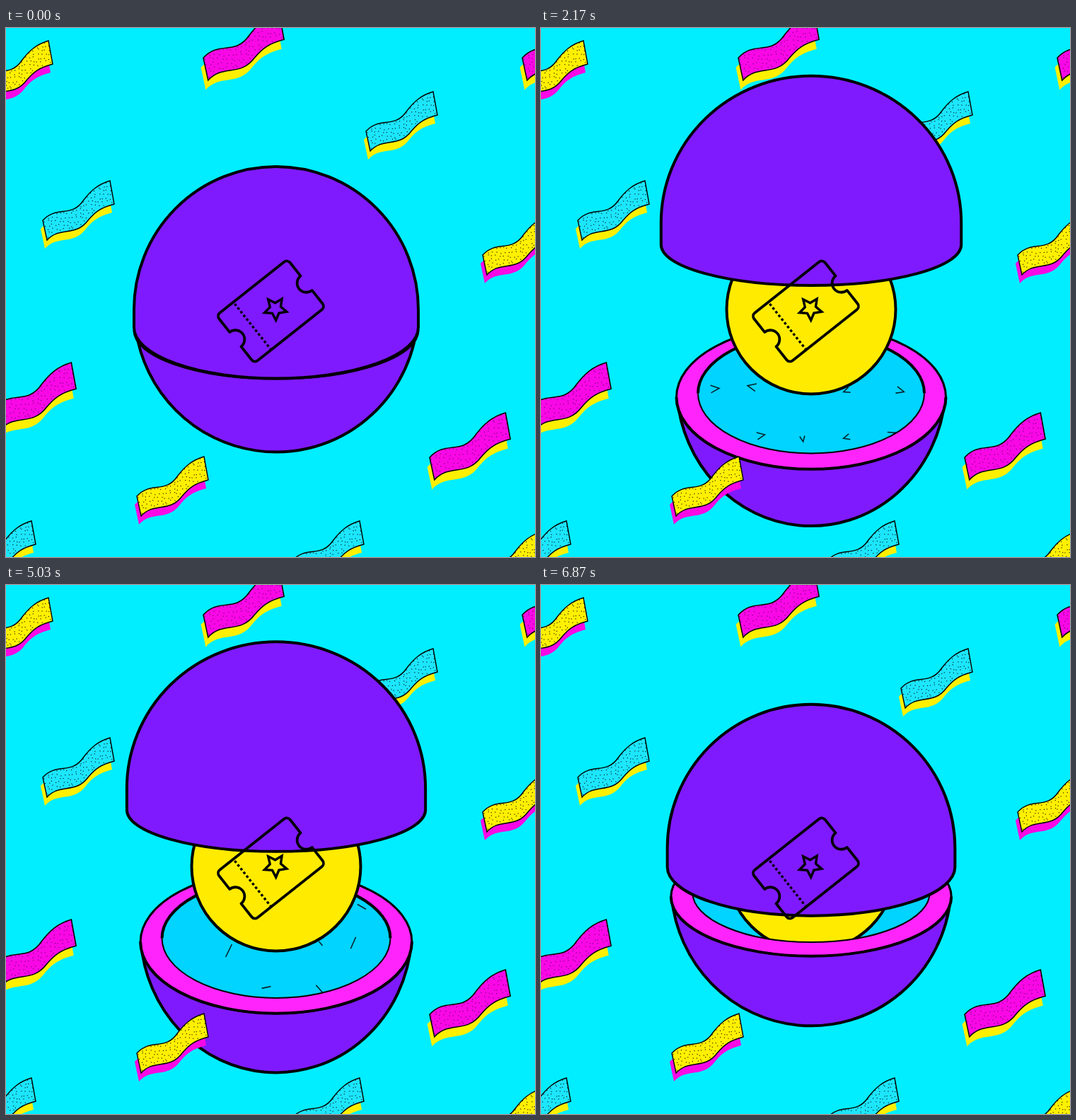
An HTML page with a canvas that plays this animation: 748 by 748 pixels, repeating every 6.96 s.

```html
<!DOCTYPE html>
<html lang="en">
<head>
<meta charset="utf-8">
<title>Capsule</title>
<style>
  html, body { margin: 0; width: 100%; height: 100%; overflow: hidden; background: #00eeff; }
  canvas { display: block; width: 748px; height: 748px; }
</style>
</head>
<body>
<canvas id="stage" width="748" height="748"></canvas>
<script>
const ctx = document.getElementById('stage').getContext('2d');
const LOOP = 6960, SECOND = 4067, CX = 382, CY = 398;
const PURPLE = '#7f1aff', PINK = '#ff24fc', WATER = '#00d4ff', GOLD = '#ffeb00';
const YELLOW = '#fff000', MAGENTA = '#f908e6', CYAN = '#1ce6fc';

// Ribbons: x, y, scale, colour
const BACK = [
  [-35, 18, 1, YELLOW], [509, 90, 1, CYAN], [52, 216, 1, CYAN], [674, 265, 1, YELLOW],
  [-15, 473, 1.13, MAGENTA], [599, 544, 1.13, MAGENTA], [-59, 697, 1, CYAN],
  [405, 697, 1, CYAN], [730, -21, 1.13, MAGENTA], [663, 712, 1, YELLOW]
];
const FRONT = [[279, -21, 1.13, MAGENTA], [185, 606, 1, YELLOW]];
const ribbon = new Path2D('M0 56C20 34 40 54 58 27C68 14 78 5 95 0L101 33C82 38 74 44 64 56C46 80 24 64 6 84Z');

// Marks inside the bowl: x, y, angle, length
const RISING = [
  [315, 517, -64, 20], [491, 506, -66, 18], [291, 579, 82, 19], [368, 569, -12, 13],
  [443, 571, 48, 14], [445, 507, 50, 8], [503, 455, 30, 14]
];
const OPEN = [
  [301, 519, 57, 20], [440, 515, 2, 14], [503, 503, 53, 18], [300, 569, 20, 20],
  [375, 574, -72, 13], [441, 580, -8, 15], [501, 584, 53, 16]
];
const CLOSING = [
  [246, 510, -5, 12], [298, 507, 192, 12], [432, 513, 160, 9], [508, 513, 15, 11],
  [311, 576, -10, 11], [370, 581, 80, 8], [432, 579, 165, 9], [496, 574, -20, 10]
];

const clamp = x => Math.min(1, Math.max(0, x));
const ease = x => (1 - Math.cos(Math.PI * clamp(x))) / 2;
const swell = (t, a, b, c, d) => ease((t - a) / (b - a)) * (1 - ease((t - c) / (d - c)));

function random(seed) {
  return () => (seed = (seed * 16807) % 2147483647) / 2147483647;
}

function stroke(width, color = '#000') {
  ctx.lineWidth = width;
  ctx.strokeStyle = color;
  ctx.stroke();
}

function shape(fill, width) {
  ctx.fillStyle = fill;
  ctx.fill();
  if (width) stroke(width);
}

function oval(y, rx, ry, from = 0, to = 2 * Math.PI) {
  ctx.beginPath();
  ctx.ellipse(CX, y, rx, ry, 0, from, to);
}

function drawRibbon([x, y, scale, color]) {
  ctx.save();
  ctx.translate(x, y);
  ctx.scale(scale, scale);
  ctx.translate(-3, 12);
  ctx.fillStyle = color === YELLOW ? MAGENTA : YELLOW;
  ctx.fill(ribbon);
  ctx.translate(3, -12);
  ctx.fillStyle = color;
  ctx.fill(ribbon);
  ctx.save();
  ctx.clip(ribbon);
  const rnd = random(77);
  ctx.fillStyle = color === MAGENTA ? 'rgba(40,0,60,.55)' : 'rgba(0,0,0,.85)';
  for (let v = 0; v < 86; v += 5.5) {
    for (let u = 0; u < 102; u += 5.5) {
      ctx.fillRect(u + rnd() * 4, v + rnd() * 4, 1.2, 1.2);
    }
  }
  ctx.restore();
  ctx.lineWidth = 1.4;
  ctx.strokeStyle = '#000';
  ctx.stroke(ribbon);
  ctx.restore();
}

function drawMarks(t) {
  const marks = t < 1400 ? RISING : t < 1900 ? OPEN : CLOSING;
  for (const [x, y, angle, size] of marks) {
    const h = size / 2;
    ctx.save();
    ctx.translate(x, y);
    ctx.rotate(angle * Math.PI / 180);
    ctx.beginPath();
    if (marks === CLOSING) {
      ctx.moveTo(-h, -h * .9);
      ctx.lineTo(h, 0);
      ctx.lineTo(-h, h * .9);
    } else {
      ctx.moveTo(-h, 0);
      ctx.lineTo(h, 0);
    }
    stroke(1.6, '#06222c');
    ctx.restore();
  }
}

function drawBowl(open, t) {
  const w = 200.5 - 12 * open;
  const ry = 68 + 34 * (1 - (1 - open) ** 3);
  const rimY = 495.5 + 154 * open - ry;
  const baseY = CY + 125.5 * open;
  const tilt = Math.asin((rimY - baseY) / 201.5);
  const inW = w - 30.5, inRy = ry * .835;
  const inY = rimY + ry - 19 - 4 * open - inRy;

  oval(baseY, w, 201.5, tilt, Math.PI - tilt);
  shape(PURPLE, 4);
  oval(rimY, w, ry);
  shape(PINK, 3);
  oval(rimY, w, ry, 0, Math.PI);
  stroke(4);

  oval(inY, inW, inRy);
  shape(WATER);
  ctx.save();
  ctx.clip();
  drawMarks(t);
  ctx.restore();
  oval(inY, inW, inRy, Math.PI, 0);
  stroke(4);

  // The ball stays behind the front wall of the bowl
  ctx.save();
  ctx.beginPath();
  ctx.ellipse(CX, inY, inW, inRy, 0, 0, Math.PI);
  ctx.lineTo(CX - inW, 0);
  ctx.lineTo(CX + inW, 0);
  ctx.clip();
  oval(CY, 119.5, 119.5);
  shape(GOLD, 4);
  ctx.restore();
  oval(inY, inW, inRy, 0, Math.PI);
  stroke(2);
}

function drawLid(open) {
  const w = 201 + 15.5 * open;
  const top = 196 - 177 * open;
  const ry = 202 + 8 * open;
  const rim = 72 - 20 * open;
  const rimY = top + 299.5 - 4.5 * open - rim;
  oval(top + ry, w, ry, Math.PI, 0);
  ctx.ellipse(CX, rimY, w, rim, 0, 0, Math.PI);
  ctx.closePath();
  shape(PURPLE, 4);
}

function drawTicket() {
  const w = 64, h = 43, r = 6, notch = 13;
  ctx.save();
  ctx.translate(374.5, 400.5);
  ctx.rotate(-38.4 * Math.PI / 180);
  ctx.lineJoin = 'round';
  ctx.beginPath();
  ctx.moveTo(0, -h);
  ctx.arcTo(w, -h, w, 0, r);
  ctx.lineTo(w, -notch);
  ctx.arc(w, 0, notch, -Math.PI / 2, Math.PI / 2, true);
  ctx.arcTo(w, h, 0, h, r);
  ctx.arcTo(-w, h, -w, 0, r);
  ctx.lineTo(-w, notch);
  ctx.arc(-w, 0, notch, Math.PI / 2, -Math.PI / 2, true);
  ctx.arcTo(-w, -h, 0, -h, r);
  ctx.closePath();
  stroke(3.8);

  ctx.setLineDash([3.5, 3.2]);
  ctx.beginPath();
  ctx.moveTo(-33.5, -h + 3);
  ctx.lineTo(-33.5, h);
  stroke(3.4);
  ctx.setLineDash([]);

  ctx.lineJoin = 'miter';
  ctx.beginPath();
  for (let i = 0; i < 10; i++) {
    const a = (i * 36 - 90) * Math.PI / 180, d = i % 2 ? 8 : 16.5;
    ctx.lineTo(7.4 + d * Math.cos(a), 1.1 + d * Math.sin(a));
  }
  ctx.closePath();
  stroke(3.4);
  ctx.restore();
}

function draw(time) {
  const t = time > SECOND - 1 ? time - 4090 : time;
  ctx.fillStyle = '#00eeff';
  ctx.fillRect(0, 0, 748, 748);
  BACK.forEach(drawRibbon);
  drawBowl(swell(t, -20, 1480, 1800, 3170), t);
  drawLid(swell(t, 20, 1560, 1620, 3175));
  drawTicket();
  FRONT.forEach(drawRibbon);
}

// 12.5 poses a second, snapped to a 30 fps clock
const start = performance.now();
let shown = -1;
function tick() {
  const t = (performance.now() - start) % LOOP;
  const beat = Math.floor((t + 5) * .03);
  const step = Math.floor((beat + .5) / 2.4) % 87;
  if (step !== shown) {
    shown = step;
    draw(Math.round(step * 2.4) / .03);
  }
  requestAnimationFrame(tick);
}
tick();
</script>
</body>
</html>
```
